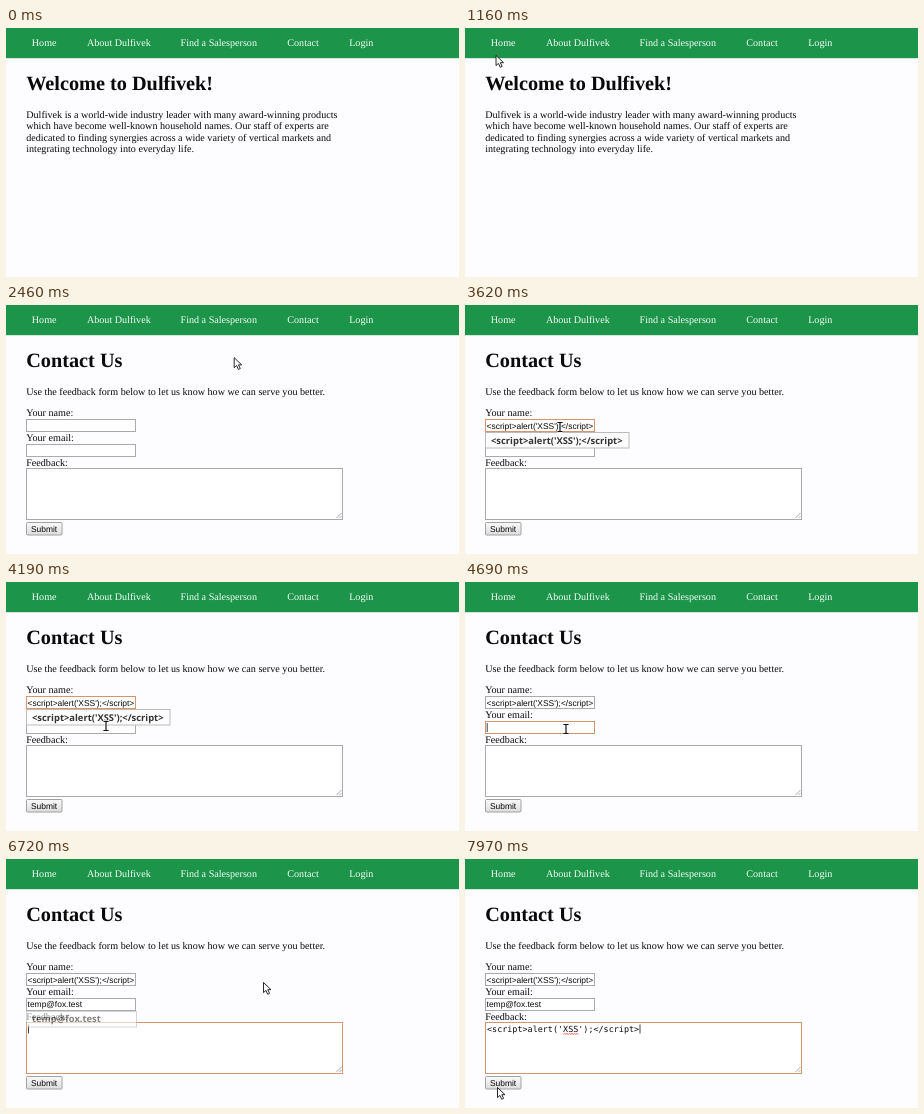
Animation, 453 px wide and 249 px high, one loop 8 s. Source, as an HTML page:

```html
<!DOCTYPE html>
<html lang="en">
<head>
<meta charset="utf-8">
<title>Contact form</title>
<style>
  html, body { margin: 0; width: 100%; height: 100%; overflow: hidden; background: #fdfcfe; }
  svg { display: block; width: 453px; height: 249px; }
  text { font: 10.13px "Liberation Serif", serif; fill: #0a0a0a; text-rendering: geometricPrecision; }
  .nav text { fill: #f4fbf6; }
  text.title { font-size: 20.27px; font-weight: bold; }
  text.ui { font: 8.44px "Liberation Sans", sans-serif; }
  text.mono { font: 8.44px "DejaVu Sans Mono", monospace; }
  .popup text { font: bold 9.4px "Noto Sans", sans-serif; fill: #333; }
  .popup rect { fill: #fdfdfe; stroke: #bbb; }
  .field { fill: #fff; stroke: #aaa; }
  .field.focus { stroke: #d7946c; filter: drop-shadow(0 0 .6px #e8a37c); }
  .caret { stroke: #111; stroke-width: .8; }
</style>
</head>
<body>
<svg viewBox="0 0 453 249">
  <defs>
    <linearGradient id="face" x2="0" y2="1">
      <stop stop-color="#fafafa"/><stop offset="1" stop-color="#dcdcdc"/>
    </linearGradient>
  </defs>
  <rect width="453" height="249" fill="#fdfcfe"/>
  <rect width="453" height="30.2" fill="#1c954a"/>
  <g class="nav">
    <text x="25.8" y="18.4">Home</text>
    <text x="80.9" y="18.4">About Dulfivek</text>
    <text x="174.5" y="18.4">Find a Salesperson</text>
    <text x="281.3" y="18.4">Contact</text>
    <text x="343.2" y="18.4">Login</text>
  </g>

  <g id="home">
    <text class="title" x="20.2" y="62">Welcome to Dulfivek!</text>
    <text x="20.2" y="90">Dulfivek is a world-wide industry leader with many award-winning products</text>
    <text x="20.2" y="101.4">which have become well-known household names. Our staff of experts are</text>
    <text x="20.2" y="112.8">dedicated to finding synergies across a wide variety of vertical markets and</text>
    <text x="20.2" y="124.2">integrating technology into everyday life.</text>
  </g>

  <g id="contact">
    <text class="title" x="20.2" y="62">Contact Us</text>
    <text x="20.2" y="90">Use the feedback form below to let us know how we can serve you better.</text>
    <text x="20.2" y="111.3">Your name:</text>
    <text x="20.2" y="136">Your email:</text>
    <text x="20.2" y="160.7">Feedback:</text>
    <rect class="field" x="20.5" y="114.5" width="109" height="12"/>
    <rect class="field" x="20.5" y="139.5" width="109" height="12"/>
    <rect class="field" x="20.5" y="163.5" width="316" height="51"/>
    <path d="M330.5 213l5-5M333.5 213l2-2" stroke="#888" stroke-width=".7"/>
    <text class="ui" id="name" x="21.6" y="123.5"></text>
    <text class="ui" id="email" x="21.6" y="148.3"></text>
    <text class="mono" id="feedback" x="22" y="173"></text>
    <path id="squiggle" d="M98.3 175.4l1.25-1 1.25 1 1.25-1 1.25 1 1.25-1 1.25 1 1.25-1 1.25 1 1.25-1 1.25 1 1.25-1 1.25 1"
          fill="none" stroke="#e03a2e" stroke-width=".8"/>
    <path class="caret" id="caret"/>
    <rect x="20.5" y="217.5" width="35.5" height="12.5" rx="1" fill="url(#face)" stroke="#a2a2a2"/>
    <text class="ui" x="25" y="227">Submit</text>
    <g class="popup" id="namePopup">
      <rect x="20.5" y="127.5" width="143.5" height="15.5"/>
      <text x="26" y="138.6">&lt;script&gt;alert('XSS');&lt;/script&gt;</text>
    </g>
    <g class="popup" id="emailPopup">
      <rect x="20.5" y="152.5" width="110" height="15.5"/>
      <text x="26" y="163.4">temp@fox.test</text>
    </g>
  </g>

  <g id="pointer">
    <path id="arrow" d="M.5 .5V10.6L2.9 8.4 4.7 12.3 6.6 11.4 4.8 7.7H8Z" fill="#fff" stroke="#111" stroke-width=".9"/>
    <g id="beam" fill="none">
      <path d="M-2.6-4.5H2.6M0-4.5V4.5M-2.6 4.5H2.6" stroke="#fff" stroke-width="2.6"/>
      <path d="M-2.6-4.5H2.6M0-4.5V4.5M-2.6 4.5H2.6" stroke="#111" stroke-width="1.2"/>
    </g>
  </g>
</svg>
<script>
const LOOP = 8000, FADE = 150;
const PAGE = 2100, NAME = 3290, PASTE = 3620, EMAIL = 4540, TYPE = 5580, FEEDBACK = 6660, PASTE2 = 7100;
const SCRIPT = "<script>alert('XSS');<\/script>", ADDRESS = "temp@fox.test";

// Pointer path: time, x, y
const path = [
  [860, 22, 143], [1160, 30, 27], [1650, 296, 15], [1710, 296, 15], [1900, 293, 14],
  [2100, 292, 14], [2460, 228, 52], [2890, 95, 122], [3950, 95, 122], [4190, 100, 144],
  [4370, 101, 147], [4950, 101, 147], [5320, 257, 123], [7550, 257, 123],
  [7860, 21, 235], [7970, 32, 228], [LOOP, 32, 228]
];

const $ = id => document.getElementById(id);
const show = (el, on) => el.style.display = on ? "" : "none";
const fields = [...document.querySelectorAll(".field")];

function pointerAt(t) {
  const i = Math.max(1, path.findIndex(p => p[0] >= t));
  const [t0, x0, y0] = path[i - 1], [t1, x1, y1] = path[i];
  const k = (t - t0) / (t1 - t0);
  return [x0 + (x1 - x0) * k, y0 + (y1 - y0) * k];
}

function inside(el, x, y) {
  const { x: bx, y: by, width, height } = el.getBBox();
  return x >= bx && x <= bx + width && y >= by && y <= by + height;
}

function popup(el, t, from, closeAt) {
  const alpha = t < from ? 0 : Math.min(1, Math.max(0, 1 - (t - closeAt) / FADE));
  el.style.opacity = alpha;
  return alpha > 0;
}

function typedCount(t) {
  if (t < TYPE) return 0;
  if (t < 5960) return Math.min(4, 1 + Math.floor((t - TYPE) / 60));
  return 5 + Math.floor((t - 5960) / 75);
}

function drawCaret(t, focus) {
  const afterText = $("email").getComputedTextLength();
  const spots = [[22.2, 116], [22.2 + afterText, 141], [t < PASTE2 ? 22.5 : 175, 165.5]];
  const visible = focus >= 0 && !(focus === 0 && t >= PASTE);
  show($("caret"), visible);
  if (visible) $("caret").setAttribute("d", `M${spots[focus]}v9`);
}

function drawPointer(t, popupOpen) {
  show($("pointer"), t >= 860);
  if (t < 860) return;
  const [x, y] = pointerAt(t);
  const overPopup = popupOpen && inside($("namePopup").firstElementChild, x, y);
  const beam = t >= PAGE && !overPopup && fields.some(f => inside(f, x, y));
  $("pointer").setAttribute("transform", `translate(${x} ${y})`);
  show($("beam"), beam);
  show($("arrow"), !beam);
}

function draw(t) {
  show($("home"), t < PAGE);
  show($("contact"), t >= PAGE);
  const focus = [NAME, EMAIL, FEEDBACK].filter(start => t >= start).length - 1;
  fields.forEach((f, i) => f.classList.toggle("focus", i === focus));

  $("name").textContent = t >= PASTE ? SCRIPT : "";
  $("email").textContent = ADDRESS.slice(0, typedCount(t));
  $("feedback").textContent = t >= PASTE2 ? SCRIPT : "";
  show($("squiggle"), t >= 7300);

  const nameOpen = popup($("namePopup"), t, PASTE, EMAIL);
  popup($("emailPopup"), t, TYPE, FEEDBACK);
  drawCaret(t, focus);
  drawPointer(t, nameOpen);
}

const start = performance.now();
function tick() {
  draw((performance.now() - start) % LOOP);
  requestAnimationFrame(tick);
}
tick();
</script>
</body>
</html>
```
